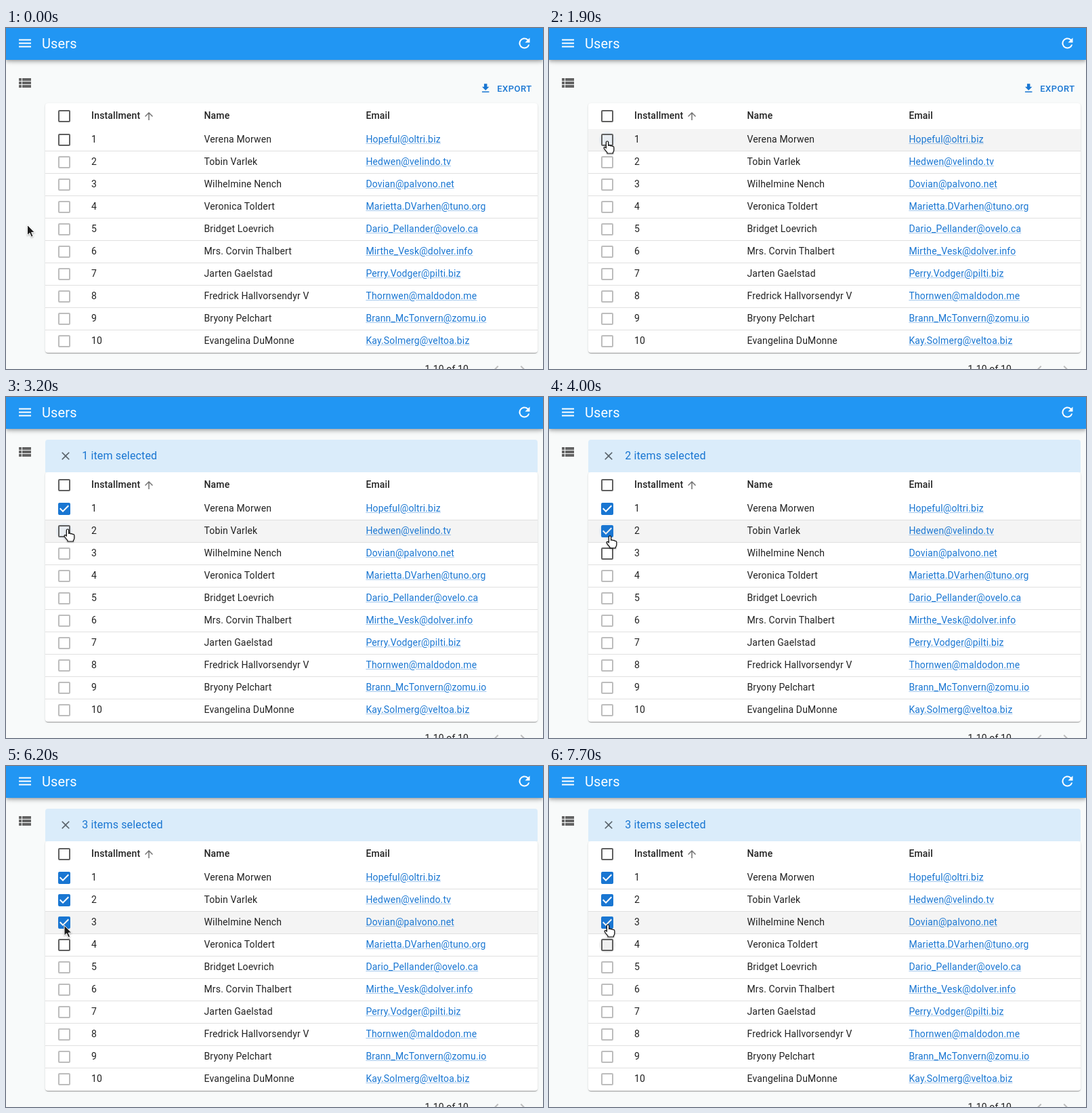
An HTML page that plays this animation: 793 px wide and 503 px high, repeating every 8 s.

```html
<!DOCTYPE html>
<html lang="en">
<head>
<meta charset="utf-8">
<title>Users</title>
<style>
  html, body { margin: 0; width: 100%; height: 100%; overflow: hidden; }
  #stage { position: relative; width: 793px; height: 503px; overflow: hidden; background: #f8fafa;
    font-family: Roboto, sans-serif; color: rgba(0, 0, 0, .87); }
  #stage div, #stage svg { position: absolute; }
  svg { left: 0; top: 0; overflow: visible; }
  .txt { white-space: pre; line-height: normal; }
  .cell { font-size: 14px; letter-spacing: .15px; }
  .head { font-weight: 500; }
  .mail { color: #1976d2; text-decoration: underline; text-decoration-color: rgba(25, 118, 210, .4); }
  #appbar { left: 0; top: 0; width: 793px; height: 46.5px; background: #2196f3; transform: translateZ(0);
    box-shadow: 0 2px 4px -1px rgba(0, 0, 0, .2), 0 4px 5px rgba(0, 0, 0, .14), 0 1px 10px rgba(0, 0, 0, .12); }
  #card { left: 58px; top: 111px; width: 727px; height: 368px; background: #fff; border-radius: 4px;
    box-shadow: 0 2px 1px -1px rgba(0, 0, 0, .2), 0 1px 1px rgba(0, 0, 0, .14), 0 1px 3px rgba(0, 0, 0, .12); }
  .row { left: 0; width: 727px; height: 32px; border-bottom: 1px solid #e0e0e0; }
  .row:last-child { border-radius: 0 0 4px 4px; }
  .row.hover { background: #f4f4f4; }
  #bar { left: 58px; width: 727px; overflow: hidden; background: #daecfa; border-radius: 4px 4px 0 0; }
  #inner { left: 0; width: 727px; height: 48px; color: #1976d2; }
  #pointer { filter: drop-shadow(.5px 1px 1px rgba(0, 0, 0, .3)); }
</style>
</head>
<body>
<div id="stage">
  <div id="appbar"></div>
  <div id="card"></div>
  <svg id="icons" width="793" height="503"></svg>
  <div id="labels"></div>
  <div id="bar"><div id="inner"></div></div>
  <svg id="pointer" width="793" height="503"></svg>
</div>
<script>
const LOOP = 8000, STEP = 100, ROW_TOP = 149, ROW_H = 33;

const users = [
  ['Verena Morwen', 'Hopeful@oltri.biz'],
  ['Tobin Varlek', 'Hedwen@velindo.tv'],
  ['Wilhelmine Nench', 'Dovian@palvono.net'],
  ['Veronica Toldert', 'Marietta.DVarhen@tuno.org'],
  ['Bridget Loevrich', 'Dario_Pellander@ovelo.ca'],
  ['Mrs. Corvin Thalbert', 'Mirthe_Vesk@dolver.info'],
  ['Jarten Gaelstad', 'Perry.Vodger@pilti.biz'],
  ['Fredrick Hallvorsendyr V', 'Thornwen@maldodon.me'],
  ['Bryony Pelchart', 'Brann_McTonvern@zomu.io'],
  ['Evangelina DuMonne', 'Kay.Solmerg@veltoa.biz']
];

const paths = {
  menu: 'M3 18h18v-2H3zm0-5h18v-2H3zm0-7v2h18V6z',
  refresh: 'M17.65 6.35A8 8 0 1 0 19.73 14h-2.08A6 6 0 1 1 12 6c1.66 0 3.14.69 4.22 1.78L13 11h7V4z',
  list: 'M3 14h4v-4H3zm0 5h4v-4H3zM3 9h4V5H3zm5 5h13v-4H8zm0 5h13v-4H8zM8 5v4h13V5z',
  download: 'M19 9h-4V3H9v6H5l7 7zM5 18v2h14v-2z',
  up: 'M4 12l1.41 1.41L11 7.83V20h2V7.83l5.58 5.59L20 12l-8-8z',
  close: 'M19 6.41L17.59 5 12 10.59 6.41 5 5 6.41 10.59 12 5 17.59 6.41 19 12 13.41 17.59 19 19 17.59 13.41 12z',
  left: 'M15.41 7.41L14 6l-6 6 6 6 1.41-1.41L10.83 12z',
  right: 'M10 6L8.59 7.41 13.17 12l-4.58 4.59L10 18l6-6z',
  box: 'M19 5v14H5V5h14m0-2H5a2 2 0 0 0-2 2v14a2 2 0 0 0 2 2h14a2 2 0 0 0 2-2V5a2 2 0 0 0-2-2z',
  ticked: 'M19 3H5a2 2 0 0 0-2 2v14a2 2 0 0 0 2 2h14a2 2 0 0 0 2-2V5a2 2 0 0 0-2-2zm-9 14l-5-5 1.41-1.41L10 14.17l7.59-7.59L19 8z',
  arrow: 'M0 0V15.2L3.5 12 6 17.8 8.6 16.7 6.1 11.1H10.8Z',
  hand: 'M-1.6 1.6a1.6 1.6 0 0 1 3.2 0V6.5q1.7-1.2 2.9.4 1.6-.8 2.7.6 2.6-.4 2.6 2V13q0 2-1.4 3.6V18H0V16.6Q-2.6 14-4.6 10.8q-.8-1.8.8-2.2 1.2 0 2.2 1.6z'
};

// time, x, y, shape
const moves = [
  [0, 31.5, 290.5, 'arrow'], [200, 31.5, 290.5, 'arrow'], [700, 52, 185, 'arrow'],
  [900, 86, 158, 'hand'], [1000, 86, 172, 'hand'], [1100, 86, 188, 'arrow'],
  [1400, 86, 217, 'arrow'], [1800, 86, 169, 'hand'], [1900, 86, 167, 'hand'],
  [2000, 86, 167, 'hand'], [2100, 87, 167, 'hand'], [2600, 87, 168, 'hand'],
  [2800, 90, 183, 'hand'], [3200, 91, 195, 'hand'], [3800, 91, 195, 'hand'],
  [4400, 87, 233, 'hand'], [6100, 87, 233, 'hand'], [6200, 86, 235, 'arrow'],
  [6300, 87, 253, 'hand'], [7500, 87, 253, 'hand'], [7700, 87, 234, 'hand']
];
const counts = [[0, 0], [2700, 1], [3700, 2], [4900, 3], [6600, 4], [7500, 3]];
const presses = [[2600, 0], [3600, 1], [4800, 2], [6500, 3], [7400, 3]]; // time, row
const BAR_START = 2675, BAR_TIME = 300;
const BUSY = [3700, 4000];

const $ = id => document.getElementById(id);
const lastBefore = (table, t) => table.findLastIndex(k => k[0] <= t);

function shape(parent, tag, attrs) {
  const el = document.createElementNS('http://www.w3.org/2000/svg', tag);
  set(el, attrs);
  parent.append(el);
  return el;
}
function set(el, attrs) {
  for (const k in attrs) el.setAttribute(k, attrs[k]);
}
function icon(parent, name, x, y, fill, size = 24) {
  return shape(parent, 'path', { d: paths[name], fill, transform: `translate(${x} ${y}) scale(${size / 24})` });
}
function label(parent, text, x, baseline, size, cls = '', css = '') {
  const el = document.createElement('div');
  el.className = 'txt ' + cls;
  el.textContent = text;
  el.style.cssText = `left:${x}px;top:${baseline - Math.round(size * .928)}px;font-size:${size}px;${css}`;
  parent.append(el);
  return el;
}

const icons = $('icons'), labels = $('labels');
shape(icons, 'rect', { width: 793, height: 46.5, fill: '#2196f3' });
icon(icons, 'menu', 16, 10.5, '#fff');
const refresh = icon(icons, 'refresh', 753.5, 10.5, '#fff');
const spinner = shape(icons, 'circle', {
  cx: 765.5, cy: 22.5, r: 7, fill: 'none', stroke: '#fff', 'stroke-width': 2, 'stroke-dasharray': '30 14'
});
icon(icons, 'list', 16, 69, '#646464');
icon(icons, 'download', 699.2, 80, '#1976d2', 18);
icon(icons, 'up', 202, 121, '#707070', 18);
icon(icons, 'box', 74, 118, '#606060');
icon(icons, 'left', 712, 492, '#bdbdbd');
icon(icons, 'right', 751, 492, '#bdbdbd');

label(labels, 'Users', 53, 30, 20, '', 'color:#fff;letter-spacing:.15px');
label(labels, 'EXPORT', 725.2, 94, 13, 'head', 'color:#1976d2;letter-spacing:.46px');
const cols = [126.1, 292.5, 531.4];
['Installment', 'Name', 'Email'].forEach((s, i) => label(labels, s, cols[i], 134, 14, 'cell head'));
label(labels, '1-10 of 10', 618.6, 508, 14, 'cell');

const rows = users.map(([name, mail], i) => {
  const line = document.createElement('div');
  line.className = 'row';
  line.style.top = ROW_TOP - 111 + i * ROW_H + 'px';
  if (i === 9) line.style.borderBottom = 0;
  $('card').append(line);
  const base = 169 + i * ROW_H;
  label(labels, i + 1, cols[0], base, 14, 'cell');
  label(labels, name, cols[1], base, 14, 'cell');
  label(labels, mail, cols[2], base, 14, 'cell mail');
  const halo = shape(icons, 'circle', { cx: 86, cy: 165 + i * ROW_H });
  return { line, halo, box: icon(icons, 'box', 74, 153 + i * ROW_H, '#bdbdbd') };
});

const closeSvg = shape($('inner'), 'svg', { width: 48, height: 48 });
icon(closeSvg, 'close', 20, 14, '#59636b', 20);
const status = label($('inner'), '', 54.2, 29, 16, '', 'letter-spacing:.15px');
const pointer = shape($('pointer'), 'path', { 'stroke-linejoin': 'round' });

// Standard curve (.4, 0, .2, 1), solved by bisection.
function ease(p) {
  let lo = 0, hi = 1;
  const curve = (u, a, b) => 3 * u * (1 - u) ** 2 * a + 3 * u * u * (1 - u) * b + u ** 3;
  for (let i = 0; i < 20; i++) {
    const mid = (lo + hi) / 2;
    if (curve(mid, .4, .2) < p) lo = mid; else hi = mid;
  }
  return curve(lo, 0, 1);
}

function pointerAt(t) {
  const i = lastBefore(moves, t), a = moves[i], b = moves[i + 1] || a;
  const p = b === a ? 0 : (t - a[0]) / (b[0] - a[0]), s = p * p * (3 - 2 * p);
  return { x: a[1] + (b[1] - a[1]) * s, y: a[2] + (b[2] - a[2]) * s, kind: a[3] };
}

function haloFor(i, t, checked, hot) {
  const press = presses.findLast(([at, row]) => row === i && at <= t && t < at + 450);
  const fill = checked ? '#1976d2' : '#000';
  if (!press) return { r: 12, fill: '#1976d2', opacity: hot ? .05 : 0 };
  const dt = t - press[0];
  if (dt < STEP) return { r: 7, fill, opacity: .16 };
  return { r: 12, fill, opacity: (checked ? .4 : .18) * (1 - dt / 450) };
}

function draw(t) {
  const { x, y, kind } = pointerAt(t);
  const hovered = x >= 58 ? Math.floor((y - ROW_TOP) / ROW_H) : -1;
  const count = counts[lastBefore(counts, t)][1];

  rows.forEach(({ line, halo, box }, i) => {
    const checked = i < count;
    line.classList.toggle('hover', i === hovered);
    set(box, {
      d: checked ? paths.ticked : paths.box,
      fill: checked ? '#1976d2' : i === count ? '#606060' : '#bdbdbd'
    });
    set(halo, haloFor(i, t, checked, i === hovered && i === count && kind === 'hand'));
  });

  const h = 48 * ease(Math.min(1, Math.max(0, (t - BAR_START) / BAR_TIME)));
  $('bar').style.top = 111 - h + 'px';
  $('bar').style.height = h + 'px';
  $('inner').style.top = (h - 48) / 2 + 'px';
  status.textContent = `${count} item${count === 1 ? '' : 's'} selected`;

  const busy = t >= BUSY[0] && t < BUSY[1];
  set(refresh, { opacity: busy ? 0 : 1 });
  set(spinner, { opacity: busy ? 1 : 0, transform: `rotate(${t * .26} 765.5 22.5)` });

  const hand = kind === 'hand';
  set(pointer, {
    d: paths[kind], transform: `translate(${x} ${y})`,
    fill: hand ? '#fff' : '#1c1c1c', stroke: hand ? '#111' : '#fff', 'stroke-width': hand ? 1.2 : 1
  });
}

function tick() {
  const t = performance.now() % LOOP;
  draw(Math.floor(t / STEP) * STEP);
  requestAnimationFrame(tick);
}
tick();
</script>
</body>
</html>
```
